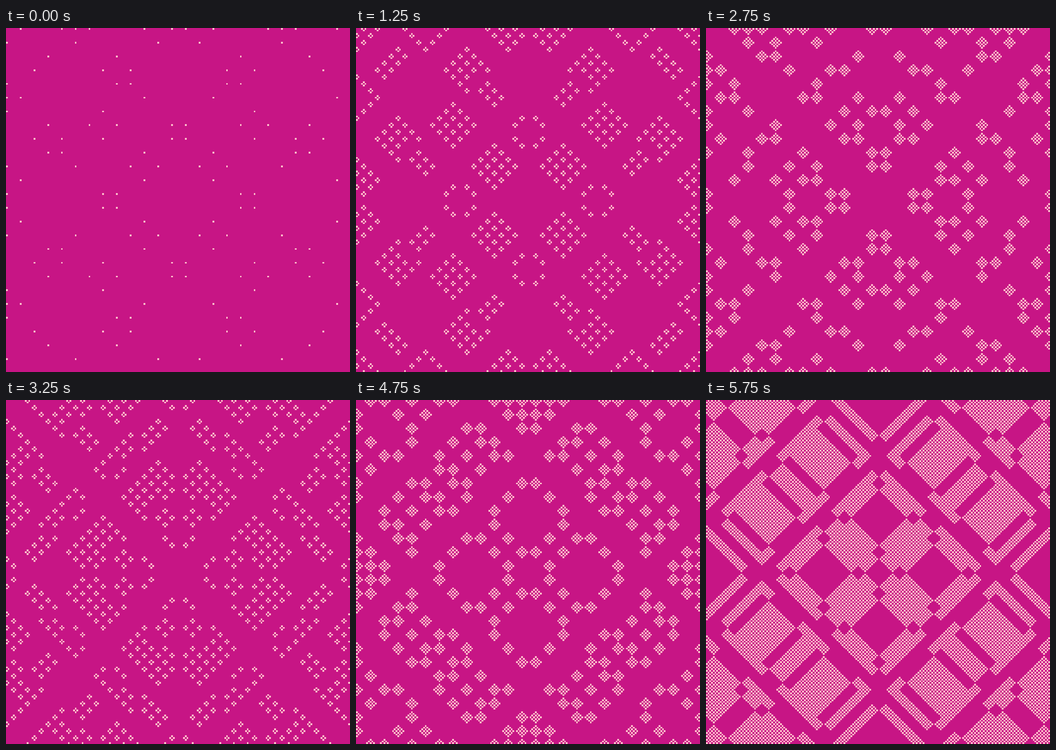
Recreate the animation shown at these times as an HTML page with a canvas. Size 748 px wide and 748 px high, loop 6000 ms.

```html
<!DOCTYPE html>
<html lang="en">
<head>
<meta charset="utf-8">
<title>Parity automaton</title>
<style>
  html, body { margin: 0; width: 100%; height: 100%; overflow: hidden; background: #c71585; }
  canvas { display: block; width: 100vw; height: 100vh; image-rendering: pixelated; }
</style>
</head>
<body>
<canvas id="stage" width="200" height="200"></canvas>
<script>
const SIZE = 200, PITCH = 8, COARSE = SIZE / PITCH;
const STEPS = 24, STEP_MS = 250;
const ctx = document.getElementById('stage').getContext('2d');
const wrap = (n, size) => (n + size) % size;

// The seed lattice is a product of one mirrored row along both diagonals.
function seedGrid() {
  const row = new Uint8Array(COARSE);
  for (const i of [1, 4, 5, 6, 10, 12]) row[i] = row[COARSE - i] = 1;
  const grid = new Uint8Array(SIZE * SIZE);
  for (let y = 0; y < COARSE; y++) {
    for (let x = 0; x < COARSE; x++) {
      grid[(y * SIZE + x) * PITCH] = row[wrap(x + y, COARSE)] & row[wrap(x - y, COARSE)];
    }
  }
  return grid;
}

// Each cell becomes the parity of its four neighbours on a torus.
function evolve(grid) {
  const at = (x, y) => grid[wrap(y, SIZE) * SIZE + wrap(x, SIZE)];
  return grid.map((_, i) => {
    const x = i % SIZE, y = Math.floor(i / SIZE);
    return at(x - 1, y) ^ at(x + 1, y) ^ at(x, y - 1) ^ at(x, y + 1);
  });
}

const grids = [seedGrid()];
while (grids.length < STEPS) grids.push(evolve(grids[grids.length - 1]));

function paint(grid) {
  ctx.fillStyle = '#c71585';
  ctx.fillRect(0, 0, SIZE, SIZE);
  ctx.fillStyle = '#ffc0cb';
  grid.forEach((alive, i) => {
    if (alive) ctx.fillRect(i % SIZE, Math.floor(i / SIZE), 1, 1);
  });
}

let start = null, shown = -1;
function tick(now) {
  if (start === null) start = now;
  const step = Math.floor(Math.max(0, now - start) / STEP_MS) % STEPS;
  if (step !== shown) {
    paint(grids[step]);
    shown = step;
  }
  requestAnimationFrame(tick);
}
paint(grids[0]);
requestAnimationFrame(tick);
</script>
</body>
</html>
```
